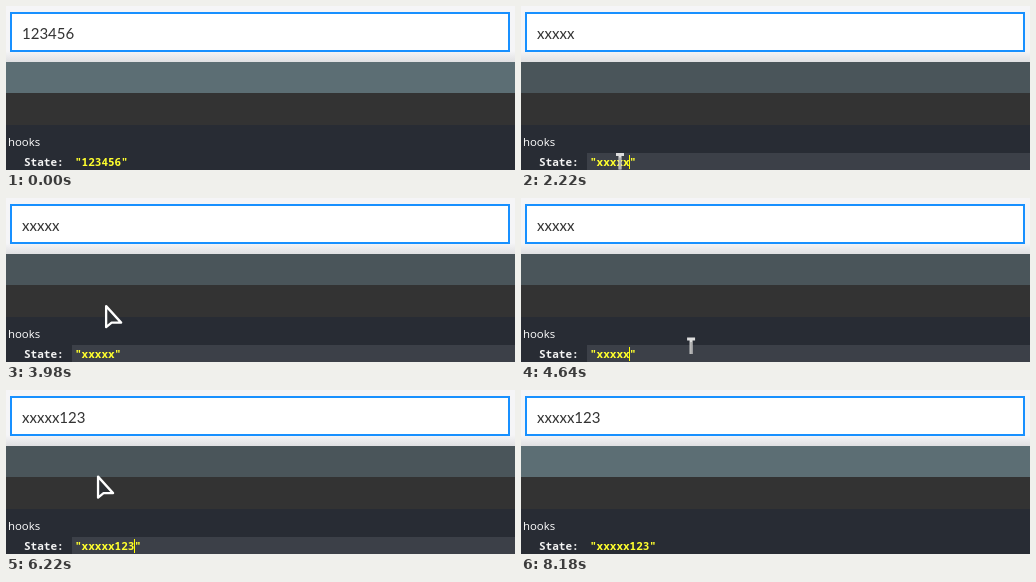
These frames come from a looping animation (509x164 px, 8.25 s). An HTML page:

```html
<!DOCTYPE html>
<html lang="en">
<head>
<meta charset="utf-8">
<style>
  html, body { margin: 0; width: 100%; height: 100%; overflow: hidden; background: #282c34; }
  svg { display: block; }
  text { white-space: pre; }
  .field { font: 15px Lato, sans-serif; fill: #333; }
  .label { font: 11.4px "Open Sans", sans-serif; fill: #fff; }
  .code { font: 600 11px "Noto Sans Mono", monospace; fill: #f4f4f4; }
  #value { fill: #ffff2e; }
  #ibeam, #arrow { stroke-linejoin: round; }
</style>
</head>
<body>
<svg width="509" height="164" viewBox="0 0 509 164">
  <defs>
    <linearGradient id="shade" x2="0" y2="1">
      <stop offset="0" stop-color="#f5f5f7"/>
      <stop offset="1" stop-color="#dedee0"/>
    </linearGradient>
  </defs>
  <rect width="509" height="57" fill="#f5f5f7"/>
  <rect y="45" width="509" height="12" fill="url(#shade)"/>
  <rect x="5" y="7" width="498" height="38" fill="#fff" stroke="#1890ff" stroke-width="2"/>
  <text id="field" class="field" x="16" y="33"></text>

  <rect id="titlebar" y="56" width="509" height="31"/>
  <rect y="87" width="509" height="32" fill="#333"/>
  <rect y="119" width="509" height="45" fill="#282c34"/>
  <text class="label" x="2" y="140">hooks</text>
  <rect id="editor" x="66" y="147" width="443" height="17" fill="#3c4048"/>
  <rect id="selection" x="75.6" y="149" width="39.6" height="14" fill="#3390ff"/>
  <text class="code" x="18" y="160">State:</text>
  <text id="value" class="code" x="69" y="160"></text>
  <rect id="caret" y="149" width="1" height="14" fill="#ff0"/>

  <circle id="click" r="12" fill="#d8d814" fill-opacity=".68"/>
  <g id="ibeam" fill="none">
    <path d="M-4-7H4M0-7V8" stroke-width="3"/>
    <path d="M0-4V8" stroke="#777" stroke-width=".8"/>
  </g>
  <path id="arrow" d="M1 1V22L6.5 17.5H16Z" fill="#2d3034" stroke="#fff" stroke-width="2.3"/>
</svg>
<script>
const LOOP = 8250, BLINK = 550;
const el = id => document.getElementById(id);
const show = (id, on) => el(id).setAttribute("visibility", on ? "visible" : "hidden");

// Pointer path: [time, x, y]
const path = [
  [210, 371, 163], [560, 235, 152], [970, 97, 156], [1170, 99, 155.5],
  [3010, 99, 155.5], [3710, 70, 32], [3840, 70, 32], [3980, 99, 107],
  [4640, 170, 148], [4910, 178, 150], [5180, 178, 150], [5450, 113, 78],
  [5740, 72, 34], [5880, 72, 34], [6640, 117, 156], [6770, 117, 156],
  [6910, 162, 156], [7120, 325, 166]
];

// [time, typed value], in order
const edits = [
  [0, "123456"], [1430, "x"], [1560, "xx"], [1760, "xxx"], [1890, "xxxx"],
  [2020, "xxxxx"], [4710, "xxxxx1"], [4780, "xxxxx12"], [4895, "xxxxx123"]
];
const commits = [[0, "123456"], [2220, "xxxxx"], [5180, "xxxxx123"]];

const latest = (list, t) => list.findLast(item => item[0] <= t);

function slope(i, axis) {
  const a = path[i - 1], p = path[i], b = path[i + 1];
  if (!a || !b || a[axis] === p[axis] || b[axis] === p[axis]) return 0;
  return (b[axis] - a[axis]) / (b[0] - a[0]);
}

function along(t, axis) {
  const i = Math.min(path.findLastIndex(p => p[0] <= t), path.length - 2);
  const a = path[i], b = path[i + 1], span = b[0] - a[0];
  const s = (t - a[0]) / span, r = 1 - s;
  return r * r * (1 + 2 * s) * a[axis] + s * s * (3 - 2 * s) * b[axis]
    + span * s * r * (r * slope(i, axis) - s * slope(i + 1, axis));
}

function drawPointer(t) {
  const visible = t >= 210 && t < 7120;
  const x = visible ? along(t, 1) : 0, y = visible ? along(t, 2) : 0;
  const overField = y < 46, overText = overField || y > 146;
  show("ibeam", visible && overText);
  show("arrow", visible && !overText);
  show("click", t >= 960 && t < 1170);
  for (const id of ["ibeam", "arrow", "click"])
    el(id).setAttribute("transform", `translate(${x} ${y})`);
  el("ibeam").setAttribute("stroke", overField ? "#555" : "#ddd");
}

function draw(t) {
  const focused = t >= 1040 && t < 8180;
  const [editTime, value] = latest(edits, t);
  const selected = t >= 1170 && t < 1430;
  el("field").textContent = latest(commits, t)[1];
  el("value").textContent = `"${value}"`;
  el("titlebar").setAttribute("fill", focused ? "#4a555a" : "#5c6e74");
  show("editor", focused);
  show("selection", selected);
  show("caret", focused && t >= 1430 && Math.floor((t - editTime) / BLINK) % 2 === 0);
  el("caret").setAttribute("x", Math.floor(69 + 6.6 * (value.length + 1)));
  drawPointer(t);
}

function tick() {
  draw(performance.now() % LOOP);
  requestAnimationFrame(tick);
}
tick();
</script>
</body>
</html>
```
